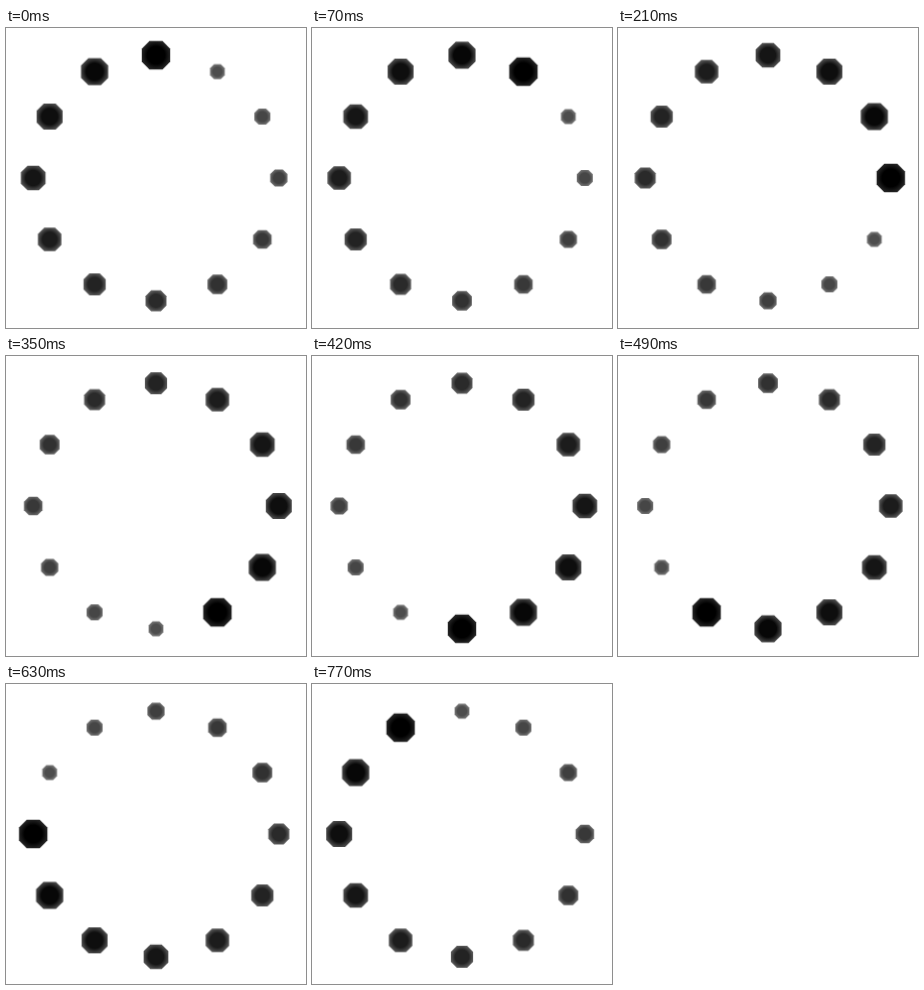
Recreate the animation shown at these times as an HTML page. Size 300 px wide and 300 px high, loop 0.84 s.

```html
<!DOCTYPE html>
<html lang="en">
<head>
<meta charset="utf-8">
<title>Loading</title>
<style>
  html, body { margin: 0; width: 100%; height: 100%; overflow: hidden; background: #fff; }
  svg { display: block; width: 100vw; height: 100vh; }
  .ring { animation: turn 840ms steps(12) infinite; }
  .dot { animation: turn 840ms steps(12) infinite reverse; animation-timing-function: steps(12, start); }
  .ring, .dot { transform-origin: 0 0; }
  @keyframes turn { to { transform: rotate(360deg); } }
</style>
</head>
<body>
<svg viewBox="-150 -150 300 300"><g class="ring" id="ring"></g></svg>
<script>
  const COUNT = 12, RADIUS = 122.8;
  const grey = v => `rgb(${v},${v},${v})`;

  // Octagon with flat sides facing the axes.
  function octagon(r) {
    const c = r * 0.46;
    return [[c, -r], [r, -c], [r, c], [c, r], [-c, r], [-r, c], [-r, -c], [-c, -r]].join(' ');
  }

  // Dots shrink and fade with distance behind the head.
  function dot(age) {
    const r = (28.4 - 1.24 * age) / 2;
    const core = age * 7;
    const rim = age ? core + 62 - age * 2 : 34;
    const angle = age * 360 / COUNT;
    return `
      <radialGradient id="g${age}">
        <stop offset=".62" stop-color="${grey(core)}"/>
        <stop offset="1" stop-color="${grey(rim)}"/>
      </radialGradient>
      <g transform="rotate(${-angle}) translate(0 ${-RADIUS}) rotate(${angle})">
        <g class="dot"><polygon points="${octagon(r)}" fill="url(#g${age})"/></g>
      </g>`;
  }

  document.getElementById('ring').innerHTML =
    Array.from({ length: COUNT }, (_, age) => dot(age)).join('');
</script>
</body>
</html>
```
